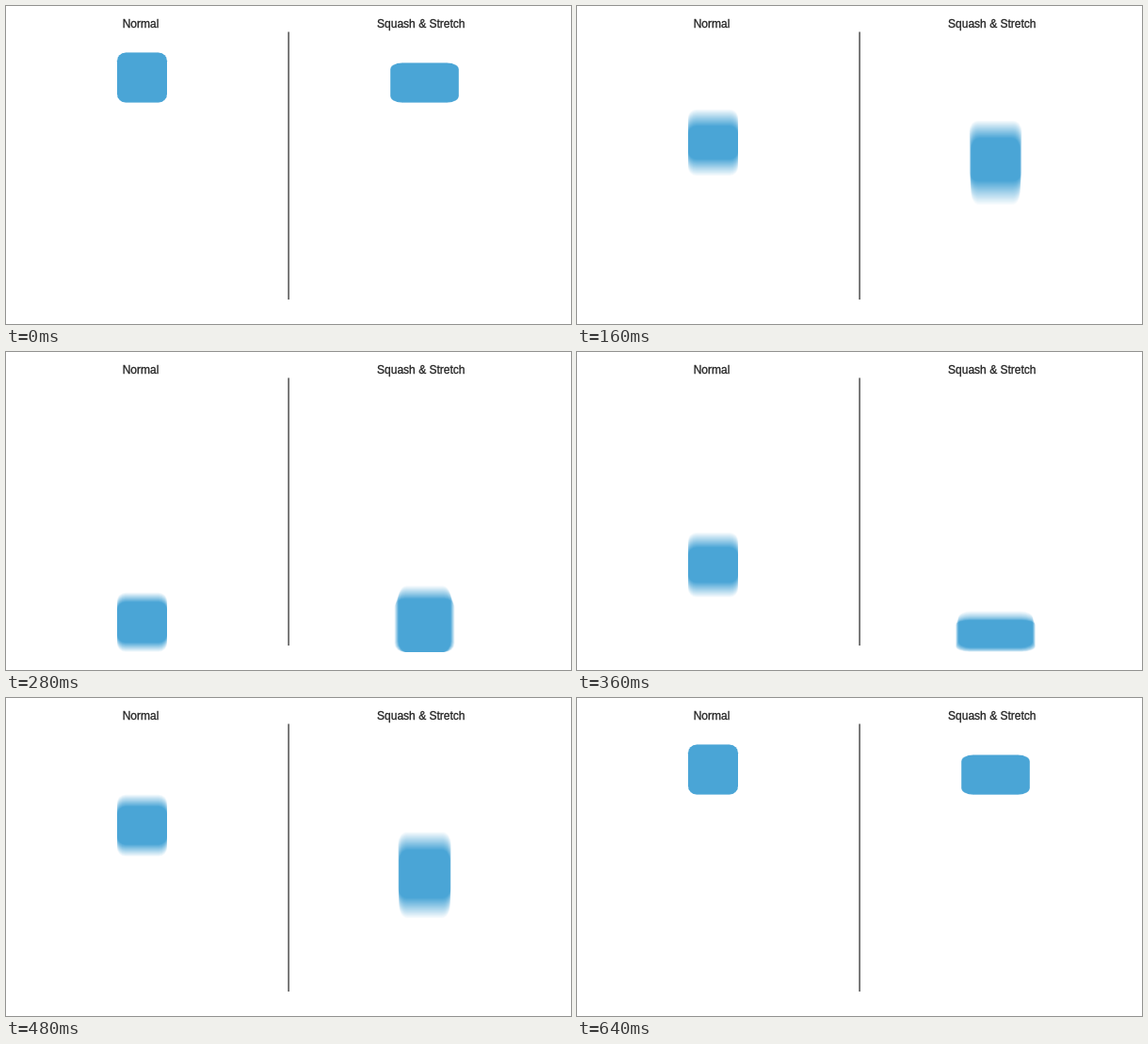
An HTML page with a canvas for the animation above (680 ms loop, 600 by 338 pixels).

```html
<!DOCTYPE html>
<html lang="en">
<head>
<meta charset="utf-8">
<title>Squash &amp; Stretch</title>
<style>
  html, body { margin: 0; width: 600px; height: 338px; overflow: hidden; background: #fff; }
  svg, canvas { position: absolute; left: 0; top: 0; display: block; }
  text {
    font: 12px "Liberation Sans", Arial, sans-serif;
    text-anchor: middle;
    fill: #222;
    stroke: #222;
    stroke-width: .3px;
  }
</style>
</head>
<body>
<canvas id="stage" width="600" height="338"></canvas>
<svg width="600" height="338" viewBox="0 0 600 338">
  <text x="143" y="23">Normal</text>
  <text x="440.8" y="23">Squash &amp; Stretch</text>
  <line x1="300.1" y1="27.5" x2="300.1" y2="312" stroke="#333" stroke-width="1.3"/>
</svg>
<script>
const LOOP = 680, STEP = 40, END = 640;
const SHUTTER = 20, SAMPLES = 51;
const SIZE = 53, RADIUS = 9, COLOR = "#4aa5d6";
const TOP = 102.5, GROUND = 319;

const ctx = document.getElementById("stage").getContext("2d");

// Cubic that starts at rest: a = 1 is quadratic, a = 3 is smoothstep.
const ease = a => u => a * u * u + (1 - a) * u ** 3;
const flip = f => u => 1 - f(1 - u);
const pow = n => u => u ** n;
const smooth = ease(3);

// A track is a start value followed by [end time, value, easing] segments.
function track(start, ...segments) {
  return t => {
    let t0 = 0, v0 = start;
    for (const [t1, v1, f] of segments) {
      if (t <= t1) return v0 + (v1 - v0) * f((t - t0) / (t1 - t0));
      t0 = t1;
      v0 = v1;
    }
    return v0;
  };
}

const plain = {
  x: 144.5,
  bottom: track(TOP, [276, GROUND, pow(2.1)], [END, TOP, flip(ease(1.75))]),
  width: () => SIZE,
  height: () => SIZE
};

const rubber = {
  x: 444.5,
  bottom: track(TOP, [233, GROUND, ease(.8)], [343, GROUND, smooth], [END, TOP, smooth]),
  width: track(72.5, [236, 39.5, ease(1.75)], [343, 85, flip(pow(1.1))],
    [435, 52.5, smooth], [END, 72.5, smooth]),
  height: track(42, [236, 100, ease(.85)], [343, 33, flip(pow(1.5))],
    [456, 73, smooth], [END, 42, smooth])
};

function addBox(box, t) {
  const w = box.width(t), h = box.height(t);
  ctx.beginPath();
  ctx.roundRect(box.x - w / 2, box.bottom(t) - h, w, h,
    { x: RADIUS * w / SIZE, y: RADIUS * h / SIZE });
  ctx.fill();
}

// Sum faint copies across the open shutter, then tint the result.
function draw(time) {
  ctx.clearRect(0, 0, 600, 338);
  ctx.globalCompositeOperation = "lighter";
  ctx.globalAlpha = 1 / SAMPLES;
  ctx.fillStyle = "#000";
  for (let i = 0; i < SAMPLES; i++) {
    const offset = (i / (SAMPLES - 1) - .5) * SHUTTER;
    const t = Math.min(END, Math.max(0, time + offset));
    addBox(plain, t);
    addBox(rubber, t);
  }
  ctx.globalCompositeOperation = "source-in";
  ctx.globalAlpha = 1;
  ctx.fillStyle = COLOR;
  ctx.fillRect(0, 0, 600, 338);
}

function tick() {
  draw(Math.floor((performance.now() % LOOP) / STEP) * STEP);
  requestAnimationFrame(tick);
}
tick();
</script>
</body>
</html>
```
